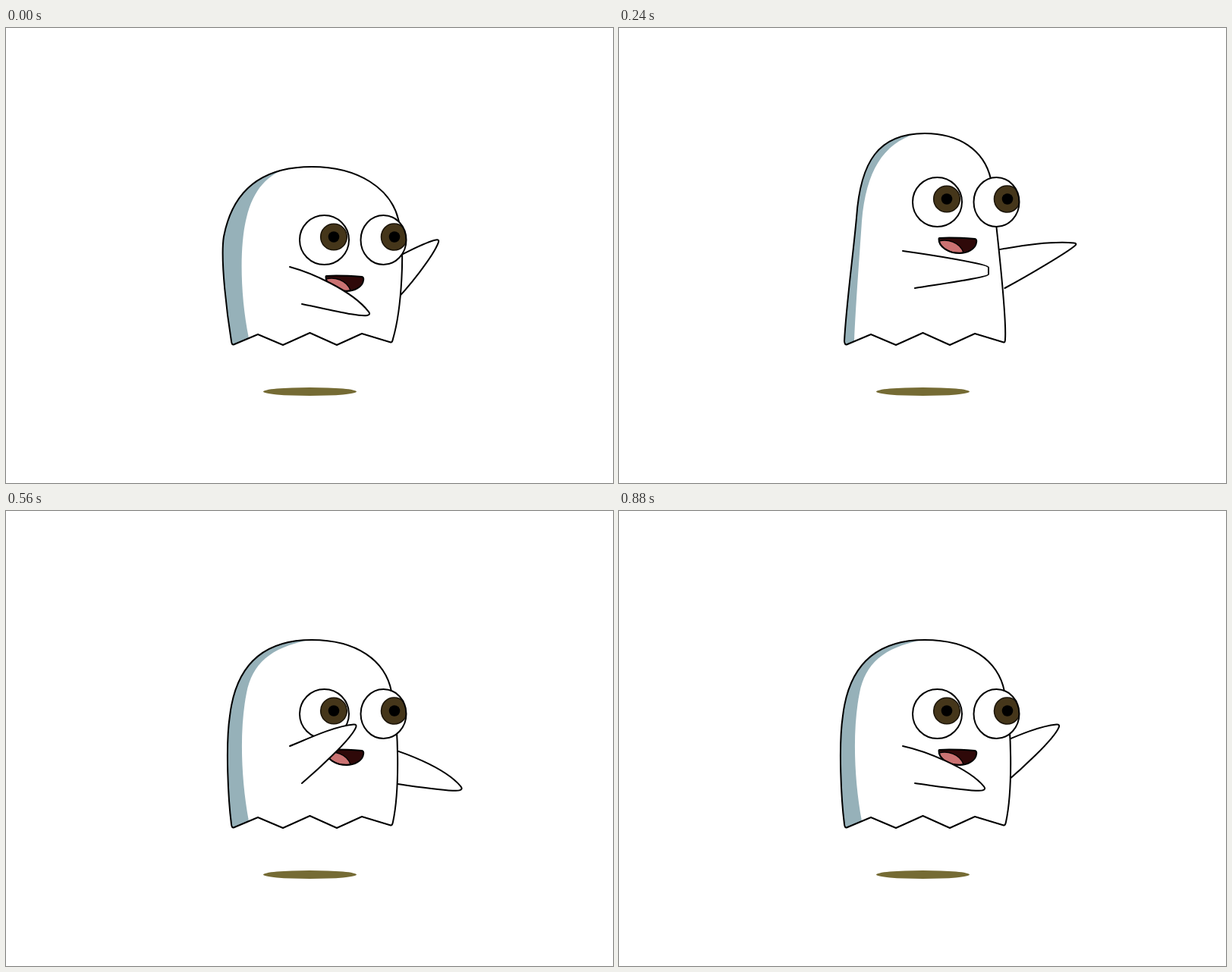
Write an HTML page that moves like this. It is 800 by 600 pixels and loops after 960 ms.

```html
<!DOCTYPE html>
<html lang="en">
<head>
<meta charset="utf-8">
<title>Running ghost</title>
<style>
  html, body { margin: 0; width: 100%; height: 100%; overflow: hidden; background: #fff; }
  svg { display: block; width: 100%; height: 100%; }
  .ink { fill: none; stroke: #000; stroke-width: 2; stroke-linejoin: round; stroke-linecap: round; }
  .white { fill: #fff; }
  .iris { fill: #45361a; stroke: #1c1509; stroke-width: 1.6; }
</style>
</head>
<body>
<svg viewBox="0 0 800 600">
  <defs>
    <clipPath id="bodyClip"><path id="clipShape"/></clipPath>
    <clipPath id="eyeClip"><ellipse cx="497.5" cy="279.5" rx="30" ry="32.5"/></clipPath>
  </defs>
  <ellipse cx="400.5" cy="479.5" rx="61.5" ry="5.5" fill="#756b34"/>
  <path id="farArm" class="ink white" transform="translate(118.5 0)"/>
  <path id="fill" class="white"/>
  <path id="shade" fill="#96b1b9" clip-path="url(#bodyClip)"/>
  <path id="outline" class="ink"/>
  <g id="face">
    <circle class="ink white" cx="419.5" cy="279.5" r="32.5"/>
    <circle class="iris" cx="432" cy="275.5" r="17.3"/>
    <circle cx="432" cy="275.5" r="7.3"/>
    <ellipse class="white" cx="497.5" cy="279.5" rx="30" ry="32.5"/>
    <g clip-path="url(#eyeClip)">
      <ellipse class="iris" cx="511.5" cy="275.5" rx="17" ry="17.5"/>
      <circle cx="512" cy="275.5" r="7.3"/>
    </g>
    <ellipse class="ink" cx="497.5" cy="279.5" rx="30" ry="32.5"/>
    <path d="M422 327C435 326 455 327 469 328Q472 329 471 333C470 342 458 347 449 347C435 347 421 339 421.500 328Z" fill="#2f0909"/>
    <path d="M422 331C432 328 449 332 454 346C436 349 424 339 422 331Z" fill="#cb7272" stroke="#000" stroke-width="1.4"/>
    <path class="ink" d="M422 327C435 326 455 327 469 328Q472 329 471 333C470 342 458 347 449 347C435 347 421 339 421.500 328Z"/>
  </g>
  <path id="nearArm" class="ink white"/>
</svg>
<script>
const STEP = 80, COUNT = 12;
const $ = id => document.getElementById(id);

// Four stretches of the body, from squashed to tall.
const stretches = [
  { face: 0, arm: 315,
    side: 'C292 382 282 306 287 275C300 207 345 183 403 183C465 183 507 212 517 252C527 290 521 372 510 410',
    shade: 'M320 409C308 350 308 285 317 250C326 213 345 192 374 184' },
  { face: -12, arm: 310,
    side: 'C293 382 289 310 295 270C303 203 340 170 403 170C462 170 500 197 508 238C518 280 519 368 510 410',
    shade: 'M320 409C309 350 308 285 317 240C325 200 350 178 408 168.5' },
  { face: -37, arm: 300,
    side: 'C297 385 298 300 305 238C313 184 348 150 403 150C450 150 482 175 494 212C506 255 514 370 510 410',
    shade: 'M313 412C308 345 311 275 323 222C333 178 360 160 408 148' },
  { face: -50, arm: 294,
    side: 'C299 370 309 295 313 250C318 176 342 139 403 139C447 139 481 160 490 199C497 255 511 380 509 410',
    shade: 'M310 413C312 365 317 300 320 255C326 185 350 150 398 137' }
];
const hem = 'Q509 415 507 414.500L469 403L436 418L400.500 402L365 418L332 404L300 417.500Q297.500 418 297 413Z';

// Arm swing: two handles of the upper edge, the tip, two handles of the lower edge.
const swing = [
  [400, 322, 455, 345, 481, 378, 465, 381, 430, 372],
  null,
  [400, 303, 450, 318, 488, 346, 465, 351, 420, 350],
  [410, 299, 487, 311, 487, 320.5, 487, 329, 420, 338],
  [405, 294, 455, 290, 480, 292, 472, 301, 420, 333],
  [390, 304, 430, 284, 463, 281, 454, 302, 410, 342],
  [395, 302, 435, 282, 453, 278.5, 445, 300, 412, 343],
  null,
  [395, 293, 440, 278, 476, 275, 460, 297, 410, 336],
  [412, 286, 455, 281, 486, 284, 472, 296, 420, 327],
  [420, 299, 485, 307, 492.5, 318, 491, 322, 420, 341],
  [402, 316, 460, 338, 484, 367, 470, 371, 420, 363]
];
swing[1] = swing[11];
swing[7] = swing[5];

function toward(x, y, tx, ty, dist) {
  const k = Math.min(0.5, dist / Math.hypot(tx - x, ty - y));
  return [x + (tx - x) * k, y + (ty - y) * k];
}

function armPath(pose, y) {
  const [ax, ay, bx, by, x, tipY, cx, cy, dx, dy] = pose;
  const p = toward(x, tipY, bx, by, 5);
  const q = toward(x, tipY, cx, cy, 5);
  return `M374 ${y}C${ax} ${ay} ${bx} ${by} ${p}Q${x} ${tipY} ${q}C${cx} ${cy} ${dx} ${dy} 390 ${y + 49}`;
}

function draw(time) {
  const n = Math.floor(time / STEP) % COUNT;
  const s = stretches[3 - Math.abs(3 - n % 6)];
  const body = 'M297 413' + s.side + hem;
  for (const id of ['clipShape', 'fill', 'outline']) $(id).setAttribute('d', body);
  $('shade').setAttribute('d', s.shade + 'L250 130L250 425L' + s.shade.slice(1, 4) + ' 425Z');
  $('face').setAttribute('transform', `translate(0 ${s.face})`);
  $('nearArm').setAttribute('d', armPath(swing[n], s.arm));
  $('farArm').setAttribute('d', armPath(swing[(n + 6) % COUNT], s.arm));
}

const start = performance.now();
function tick() {
  draw(performance.now() - start);
  requestAnimationFrame(tick);
}
draw(0);
requestAnimationFrame(tick);
</script>
</body>
</html>
```
